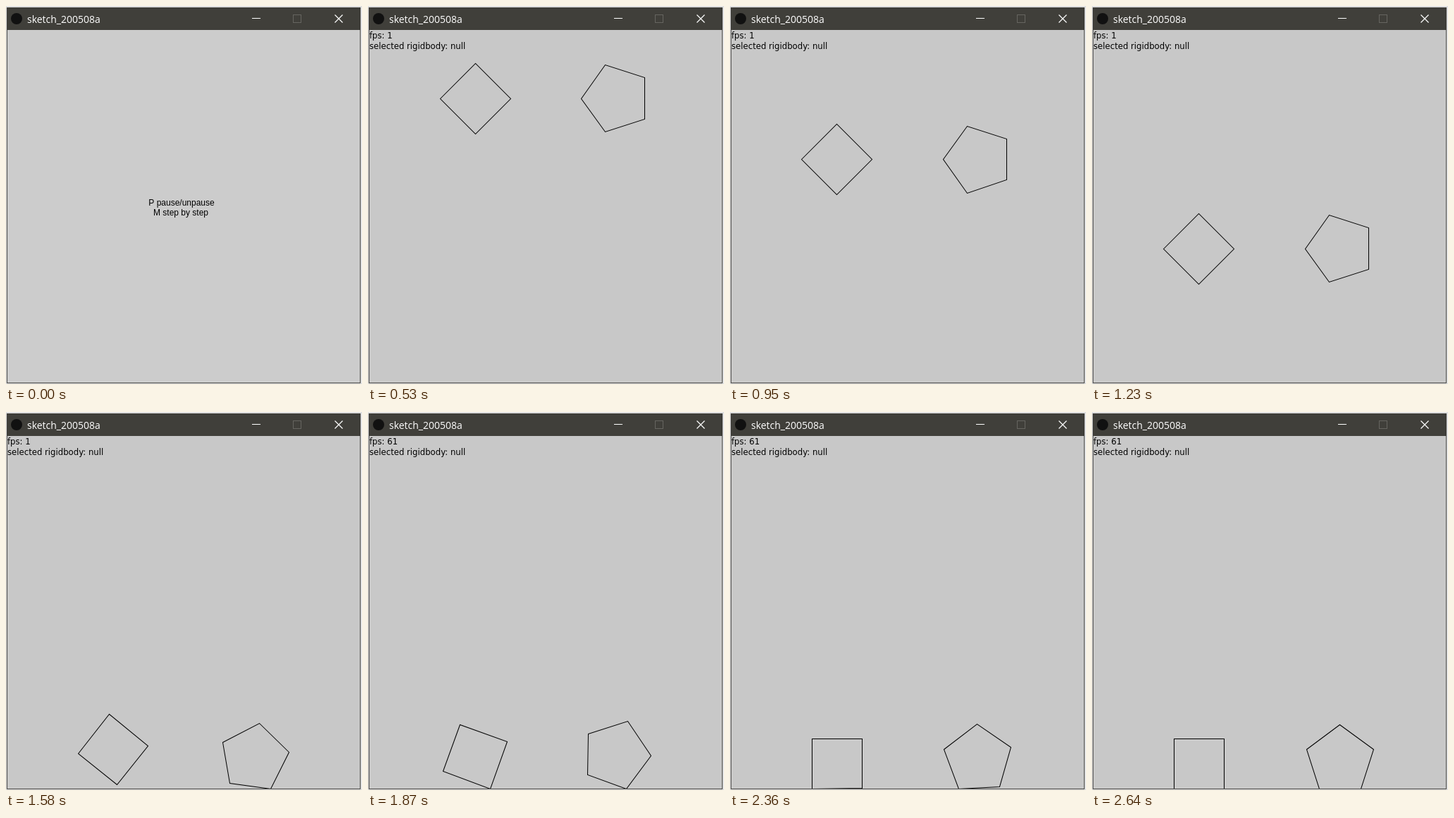
An HTML page with a canvas that plays this animation: 505 px wide and 536 px high, repeating every 2.91 s.

```html
<!DOCTYPE html>
<html lang="en">
<head>
<meta charset="utf-8">
<title>Rigid bodies</title>
<style>
  html, body { margin: 0; width: 100%; height: 100%; overflow: hidden; }
  canvas { display: block; }
</style>
</head>
<body>
<canvas id="stage" width="505" height="536"></canvas>
<script>
const ctx = document.getElementById('stage').getContext('2d');
const LOOP = 2910, START = 530, STEP = 70;
const FLOOR = 534.01, RADIUS = 50, HALF_G = 352;
const DROP_TIME = 0.4478, DROP_Y = 128.8;
const ROCK_DECAY = 0.35;

// rocking from corner to corner: parabolic hops, each shorter and to the other side
function rock(t, start, span, height) {
  for (; span > 0.01; span *= ROCK_DECAY, height *= -ROCK_DECAY * ROCK_DECAY) {
    const u = (t - start) / span;
    if (u < 1) return 4 * height * u * (1 - u);
    start += span;
  }
  return 0;
}

// times in seconds, turns in degrees, rebound in pixels per second
const square = {
  sides: 4, hit: 1.452, land: 1.7, rebound: 85,
  x: t => 152.05 - 0.15 * (t - 0.53),
  turn(t) {
    const flat = 2.04, u = (t - this.hit) / (flat - this.hit);
    return t < flat ? -45 * u * (0.62 + 0.38 * u * u) : -45 + rock(t, flat, 0.22, -2);
  }
};
const pentagon = {
  sides: 5, hit: 1.456, land: 1.6, rebound: 12,
  x: () => 352,
  turn(t) {
    return Math.min(213 * (t - this.hit), 18 + rock(t, 1.483, 0.764, 19));
  }
};

const fallY = t => DROP_Y + HALF_G * (t - DROP_TIME) ** 2;

function centerY(body, t, reach) {
  if (t < body.hit) return fallY(t);
  const s = t - body.hit;
  return t < body.land ? fallY(body.hit) - body.rebound * s + HALF_G * s * s : FLOOR - reach;
}

function drawBody(body, t) {
  const turn = t < body.hit ? 0 : body.turn(t);
  const corners = Array.from({ length: body.sides }, (_, i) => {
    const a = (180 + turn + i * 360 / body.sides) * Math.PI / 180;
    return [RADIUS * Math.cos(a), RADIUS * Math.sin(a)];
  });
  const x = body.x(t), y = centerY(body, t, Math.max(...corners.map(c => c[1])));
  ctx.beginPath();
  for (const [dx, dy] of corners) ctx.lineTo(Math.floor(x + dx) + 0.5, Math.floor(y + dy) + 0.5);
  ctx.closePath();
  ctx.stroke();
}

function rect(color, x, y, w, h) {
  ctx.fillStyle = color;
  ctx.fillRect(x, y, w, h);
}

function text(string, x, y, font, color = '#000', align = 'left') {
  ctx.font = font;
  ctx.fillStyle = color;
  ctx.textAlign = align;
  ctx.fillText(string, x, y);
}

function drawWindow() {
  rect('#dedede', 0, 0, 505, 536);
  rect('#4b4a47', 1, 2, 502, 533);
  rect('#403f3a', 1, 2, 502, 32);
  ctx.fillStyle = '#111';
  ctx.beginPath();
  ctx.arc(15, 18, 8, 0, 7);
  ctx.fill();
  text('sketch_200508a', 30, 24, '14px "Open Sans", sans-serif', '#fff');
  rect('#fff', 349, 17, 12, 1);
  ctx.lineWidth = 1;
  ctx.strokeStyle = '#666560';
  ctx.strokeRect(407.5, 12.5, 11, 11);
  ctx.lineWidth = 1.2;
  ctx.strokeStyle = '#fff';
  ctx.beginPath();
  ctx.moveTo(466.5, 12.5);
  ctx.lineTo(477.5, 23.5);
  ctx.moveTo(477.5, 12.5);
  ctx.lineTo(466.5, 23.5);
  ctx.stroke();
}

function drawHelp() {
  const font = '12px "Liberation Sans", Arial, sans-serif';
  rect('#ccc', 2, 34, 500, 500);
  text('P pause/unpause', 249, 283, font, '#000', 'center');
  text('M step by step', 248, 297, font, '#000', 'center');
}

function drawWorld(ms) {
  const font = '11.7px "DejaVu Sans", sans-serif';
  ctx.save();
  ctx.beginPath();
  ctx.rect(2, 34, 500, 500);
  ctx.clip();
  rect('#c8c8c8', 2, 34, 500, 500);
  text('fps: ' + (ms < 1650 ? 1 : 61), 2, 46, font);
  text('selected rigidbody: null', 2, 61, font);
  ctx.strokeStyle = '#000';
  ctx.lineWidth = 1.01; // just above 1 avoids the thinner hairline rendering
  drawBody(square, ms / 1000);
  drawBody(pentagon, ms / 1000);
  ctx.restore();
}

// the picture advances in steps, with one slightly longer before 2150 ms
function stepTime(ms) {
  const snap = from => from + Math.floor((ms - from) / STEP) * STEP;
  return ms < 2150 ? Math.min(snap(START), 2070) : Math.min(snap(2150), 2640);
}

function frame() {
  const ms = performance.now() % LOOP;
  drawWindow();
  if (ms < START) drawHelp();
  else drawWorld(stepTime(ms));
  requestAnimationFrame(frame);
}
frame();
</script>
</body>
</html>
```
